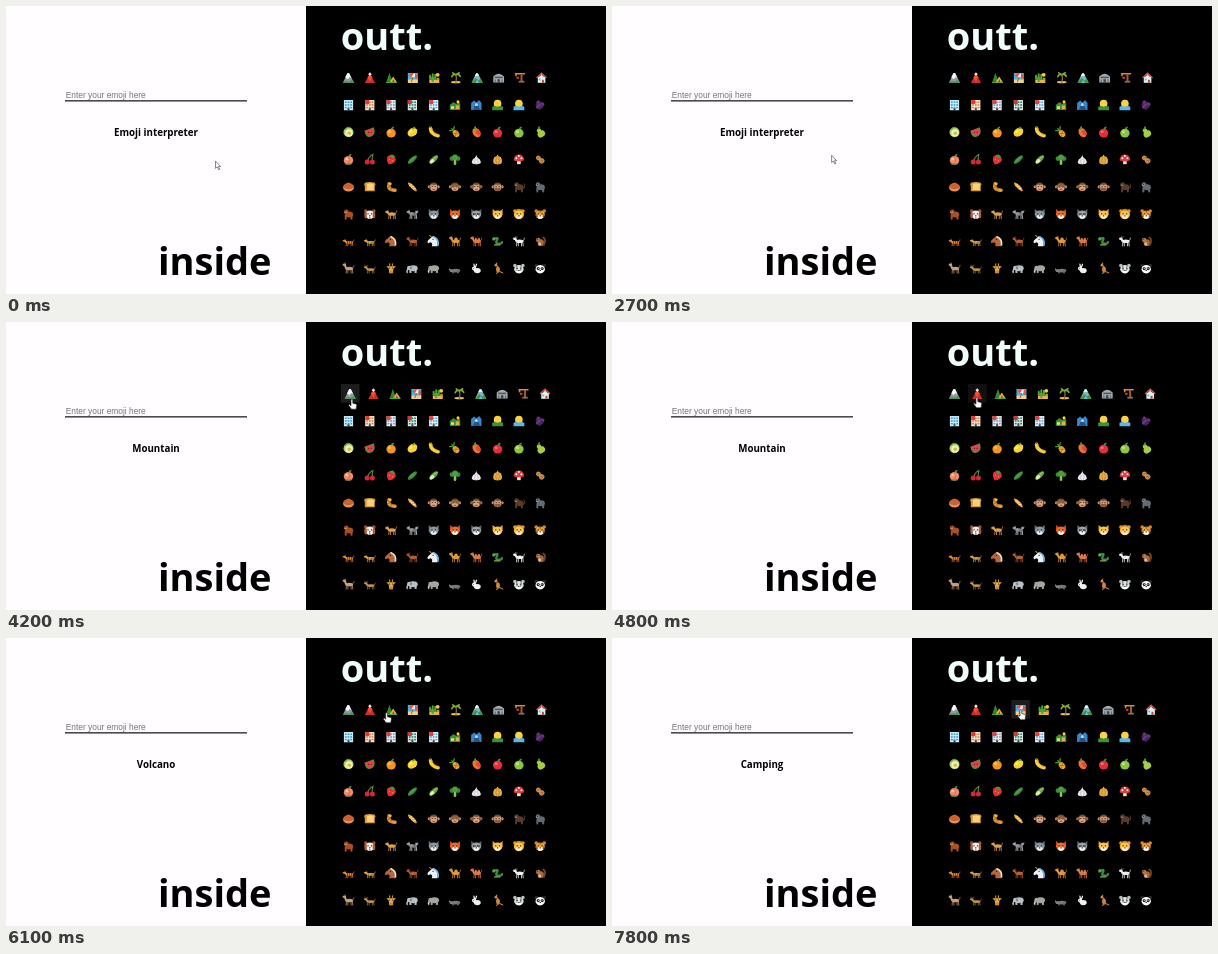
Write an HTML page that moves like this. It is 600 px wide and 288 px high and loops after 8 s.

```html
<!DOCTYPE html>
<html lang="en">
<head>
<meta charset="utf-8">
<title>Emoji interpreter</title>
<style>
html, body { margin: 0; width: 100%; height: 100%; overflow: hidden; background: #fffdff; }
svg { display: block; width: 100%; height: 100%; }
.big { font: bold 38px "Open Sans", "Noto Sans", sans-serif; }
.word { font: bold 9.75px "Open Sans", "Noto Sans", sans-serif; text-anchor: middle; }
.hint { font: 8.4px "Liberation Sans", Arial, sans-serif; fill: #757575; }
</style>
</head>
<body>
<svg viewBox="0 0 600 288">
  <rect width="600" height="288" fill="#fffdff"/>
  <rect x="300" width="300" height="288"/>
  <text class="big" x="152" y="269">inside</text>
  <text class="big" x="334.7" y="44" fill="#f0fffc">outt.</text>
  <text class="hint" x="59.7" y="92">Enter your emoji here</text>
  <rect x="59" y="94.2" width="182" height="1.3" fill="#222"/>
  <text class="word" id="word" x="150" y="129.5"></text>
  <g id="boxes"></g>
  <g id="grid"></g>
  <path id="arrow" d="M0 0v7.4l1.7-1.5 1.4 2.9 1.1-.5-1.3-2.8h2.2z" fill="#fff" stroke="#555" stroke-width=".7"/>
  <path id="hand" d="M-1 .8q.9-1.4 1.8 0v3.4l3.2.8q.8.3.7 1.3l-.6 3.9h-4.6l-2.8-3.8q.2-1.2 1.2-.7l1.1 1z" fill="#fff" stroke="#222" stroke-width=".6"/>
</svg>
<script>
const $ = id => document.getElementById(id);

// Shape helpers; every emoji is drawn around 0,0 within about 6 units.
const E = (x, y, a, b, f) => `<ellipse cx="${x}" cy="${y}" rx="${a}" ry="${b}" fill="${f}"/>`;
const O = (x, y, r, f) => E(x, y, r, r, f);
const R = (x, y, w, h, f) => `<rect x="${x}" y="${y}" width="${w}" height="${h}" fill="${f}"/>`;
const P = (d, f) => `<path d="${d}" fill="${f}"/>`;
const L = (d, f, w = 1) => `<path d="${d}" fill="none" stroke="${f}" stroke-width="${w}" stroke-linecap="round"/>`;
const turn = (a, s) => `<g transform="rotate(${a})">${s}</g>`;
const low = s => `<g transform="translate(0 1) scale(1 .75)">${s}</g>`;
const pair = (x, y, r, f) => O(-x, y, r, f) + O(x, y, r, f);

const green = '#3f9b35', dark = '#2a2320', ink = '#111';
const leaf = P('M0-3q0-3 3-2.6q0 2.4-3 2.6', green);
const pine = x => P(`M${x}-5l3 9h-6z`, '#2f8a2e');
const peak = f => P('M-5.6 5L-1-4.6h1.6L5.6 5z', f);

const tower = (wall, win, sign) => {
  let s = R(-4.6, -5, 9.2, 10.2, wall);
  for (let i = 0; i < 9; i++) s += R(-3.6 + i % 3 * 2.7, -3.6 + (i / 3 | 0) * 2.7, 1.8, 1.6, win);
  return s + R(-1, 3.2, 2, 2, '#345') + (sign ? R(-4.6, -5, 4, 4, sign) : '');
};
const fruit = (f, shine, a = 4.7, b = 4.4) => E(0, .8, a, b, f) + E(-1.5, -.6, 1.6, 1.2, shine) + leaf;
const sun = ground => O(0, -1.4, 3.8, '#ffd23c') + P('M-5.4 5.2v-3.4q2.6-1.6 5.4 0q2.8-1.6 5.4 0v3.4z', ground);
const palm = L('M0 5q1.4-5 0-8', '#9a6532', 1.2) + L('M-4-1q1-3 4-2q3-1.5 4.5 1.5M-3-5l3 2l3.5-2', '#7cae35', 1.6);

const face = (fur, muzzle, ear, sharp) =>
  (sharp ? P('M-5-5l4 3h2l4-3v6h-10z', ear) : pair(4, -3, 1.8, ear)) +
  E(0, .6, 4.7, 4.2, fur) + E(0, 2.6, 2.8, 2, muzzle) +
  pair(1.8, -.2, .65, ink) + E(0, 1.8, .8, .55, ink);
const stripes = L('M0-3.4v1.6M-4.4 1h1.3M4.4 1h-1.3M-4 2.8l1.2-.4M4 2.8l-1.2-.4', dark, .7);
const monkey = extra => pair(4.6, 0, 1.5, '#c98e63') + O(0, 0, 4.4, '#754a30') +
  pair(1.6, -.5, 1.9, '#dfa77c') + E(0, 2, 3.2, 2, '#dfa77c') + pair(1.5, -.5, .6, ink) + L('M-1 2.5h2', dark, .6) + extra;
const paws = (x, y) => pair(x, y, 1.7, '#8a5a3b');

const beast = (fur, legs, neck = 0, extra = '') =>
  L('M4-.5q1.8-.6 1.6-2.8', legs, .8) + L('M-2 1l-.4 3.6M-.6 1v3.6M2.6 1v3.6M3.9 1l.4 3.6', legs) +
  E(.8, 0, 3.9, 1.8, fur) + L(`M-2.4-.4L-3.8 ${-2 - neck}`, fur, 2) +
  E(-4.1, -2 - neck, 1.8, 1.3, fur) + L(`M-3.2 ${-3 - neck}v-.8`, legs, .8) + extra;
const heavy = (f, nose) => E(.8, -.4, 4.5, 3, f) + R(-3, 1, 2, 3.4, f) + R(2.2, 1, 2, 3.4, f) + O(-3.2, -.6, 2.2, f) + nose;
const horse = (coat, mane, extra = '') => P('M-1-5q5 0 5 10h-6q1.4-3-1-4l-2.6 1q-1.4-1 0-3z', coat) +
  L('M0-4.5q5 2 4.4 8', mane, 1.7) + O(-.6, -2, .6, ink) + extra;
const ape = (f, d) => E(.8, .5, 3.9, 3, f) + O(-2.2, -2.2, 2.3, f) + L('M-2.8 1v3.6M3 1v3.6', f, 2) + E(-2.9, -1.8, 1.3, 1.1, d) + O(-2.8, -2.4, .5, ink);

const rows = [
  [
    peak('#8d9aa3') + P('M-3.2-.6L-1-4.8h1.6L2.8 0L.8-.6L-.8 1.4z', '#f4f8fa') + P('M-5.8 5l3-2l3 1l3-2l2.6 3z', '#4b9a50'),
    P('M-5.2 5.2L-1.5-1.6h3L5.2 5.2z', '#c92f2a') + P('M-2.6 0l1.1-2h3L3 1 1.4 0 .3 4z', '#ff4a2b') + P('M0-5.6l1.8 2L0-1.6l-1.8-2z', '#f3e4e2'),
    pine(-2) + P('M-2 4.6L1.8-1.2L5.6 4.6z', '#f0b429') + P('M.7 4.6l1.2-3.4l1.3 3.4z', '#7d4a14') + R(-5.4, 4, 11, 1.2, '#5c9e31'),
    R(-5, -4.8, 10, 6.4, '#46b4e8') + R(-5, 1.4, 10, 3.8, '#f1d18a') + turn(20, P('M-4.6-.4q.6-4.4 4.6-4.4t4.6 4.4z', '#ee5136') + P('M-1.4-.4q0-4 1.4-4.4q1.4.4 1.4 4.4z', '#fff') + L('M0-.4v4.4', '#8b5a2b', .8)),
    R(-5, 1.6, 10, 3.6, '#e8b53a') + L('M-1.6 3.4v-7M-4.2-2v2.4h5.2v-3.4', '#4fa23c', 2) + O(3.4, -3, 1.9, '#ffc933') + R(2.4, 0, 2.6, 2, '#8fae3c'),
    E(0, 4.4, 4.8, 1.1, '#e9c46a') + palm,
    peak('#79b9bd') + P('M-2.6-1.6L-1-4.6h1.6L2-2z', '#e8f6f4') + P('M-5.6 5.2l4-5l3 2.4l2-2l2.2 4.6z', '#40933f') + P('M0 2l2 3.2h-4z', '#55c2ee'),
    P('M-5.4 4.6v-6q5.4-5.4 10.8 0v6z', '#a4adb2') + R(-4, -1.2, 8, 1.6, '#4d585e') + L('M-3.4 2v2M3.4 2v2', '#5e6a70', 1.2) + R(-1.2, 1.4, 2.4, 3.2, '#3c454a'),
    L('M-4.6-4h9M-4-4v2', '#e58b22', 1.5) + L('M1.4-3v6.4', '#a55a2b', 2) + R(-3.6, -1, 2.4, 2, '#c8472e') + R(-1.4, 3, 5.6, 1.8, '#8d6e50'),
    R(-3.8, -1, 7.6, 6, '#dff2f2') + L('M-4.6-.2L0-4.6L4.6-.2', '#d4574d', 1.4) + P('M-3-.4L0-3.4L3-.4z', '#dff2f2') + R(.4, 2, 2, 3, '#b3503c') + R(-2.8, .8, 1.8, 1.8, '#63b7dc')
  ],
  [
    tower('#d4eef8', '#3c9fd4'), tower('#f4e6da', '#e0813a', '#e6372c'), tower('#f3ecec', '#6aa6c8', '#e24238'),
    tower('#e4e9e6', '#2f7f72', '#c93b35'), tower('#edf5f9', '#57a9d8', '#ea3d36'),
    P('M-5.2 5v-5l3.6-3l3 2l2-2.4l1.8 2v6.4z', '#3c8f32') + O(3, -3.4, 1.5, '#ffd23c') + R(-4, 1.2, 3, 2.6, '#f0dc6c') + R(.8, .4, 3.4, 3.6, '#d9b344'),
    P('M-5.2 5v-7l3-2.6l2.4 2l2.6-2.4l2.4 3v7z', '#3a86c4') + P('M-3.4 5L-.6-1.8h1.4L4 5z', '#20558c') + P('M-1.6 .6l1-2.4h1.4l1 2.4z', '#cde8fa'),
    sun('#3c9140'), sun('#58b7ec'),
    turn(25, [0, 1, 2, 3, 4, 5, 6, 7].map(i => O(-3 + i % 3 * 2.5 + (i > 5 ? 1.5 : 0), -1.8 + (i / 3 | 0) * 2.3, 1.7, i % 2 ? '#4c2560' : '#693a82')).join(''))
  ],
  [
    O(0, 0, 5, '#a8cf63') + O(.5, .6, 3.7, '#eff0b8') + O(.8, 1, 1.8, '#d3b84f') + L('M-3-3l2-2.4', green, 1),
    P('M-5.4-1.5L4-5q3 8-4 9.6q-4 .6-5.4-6', '#3f9b35') + P('M-4.4-1.5L3.4-4q2 6-3 7.4q-3.4 0-4.8-5', '#ee3c43') + pair(1.3, 0, .5, ink),
    fruit('#f79321', '#ffbc58'), turn(-35, E(0, 0, 5.2, 4, '#fbd32d') + E(-1, -1.4, 2, 1, '#fff07d')) + leaf,
    L('M-3.2-4q.2 6 7.6 7.4', '#f9cf3c', 3.6) + L('M-2-4q1 4.8 7 6.6', '#c98f1f', .7) + R(-4.4, -5.8, 2, 1.4, '#7d6220'),
    turn(-40, E(0, 1.6, 2.9, 3.8, '#eba82d') + L('M-2 0l4 3M2 0l-4 3', '#a66818', .6) + L('M0-2.5v-2.4M-1-3l-2-1.8M1-3l2-1.8', green, 1.3)),
    turn(-35, E(0, .4, 3.6, 5, '#f0742e') + E(1.4, 1.4, 2, 3, '#df4a34') + leaf),
    fruit('#e32f37', '#fa7172'), fruit('#8cc63c', '#c5e779'), turn(-35, E(0, 2, 4, 3.2, '#a5cf42') + E(0, -1.6, 2.2, 2.8, '#a5cf42') + leaf)
  ],
  [
    fruit('#f58b66', '#ffc09a') + L('M0-3q2 3 .4 7', '#d85f4f', .7) + L('M-3.4 4.4h6', green, 1),
    L('M-2.5 2Q-1-3 3-5Q2-1 2.4 2', '#538a31', 1.2) + pair(2.6, 2.4, 2.5, '#d72634'),
    turn(25, P('M-4.6-1.8q4.6-4 9.2 0q0 5-4.6 7.2q-4.6-2.2-4.6-7.2', '#e62f36') + pair(1.6, .6, .45, '#ffd27b') + P('M-3.6-3L0-2l3.6-1L1-5h-2z', green)),
    turn(-42, E(0, 0, 5.8, 2.2, '#3b8e36') + L('M-3-.4h6', '#78bd53', .6)),
    turn(-42, E(0, 0, 5.7, 2.4, '#66a83f') + E(-2.4, .2, 2.6, 1.7, '#d9efaa') + L('M1-.5h3', '#b3d777', .8)),
    L('M0 0v4.2', '#8fc25b', 2.6) + pair(3, -1, 2.4, '#3d8a34') + O(0, -2.2, 2.9, '#48a13d'),
    P('M0-5.4q0 3 3.4 5q3.2 5.2-3.4 5.2q-6.6 0-3.4-5.2q3.4-2 3.4-5', '#efe7ee') + L('M-1-.6q-2 3 0 5M1-.6q2 3 0 5', '#bdaac0', .6),
    P('M0-5q.4 2 3.4 2.7q3.4 7-3.4 7.3q-6.8-.3-3.4-7.3Q-.4-3 0-5', '#e8ac40') + L('M-1-2q-2 3 0 6M1-2q2 3 0 6', '#b97422', .6),
    R(-1.8, 0, 3.6, 4.6, '#f4e1c8') + P('M-5.4 .8q.6-5.8 5.4-5.8t5.4 5.8q-5 2-10.8 0', '#df393a') + pair(2.5, -1.4, 1, '#fff') + O(0, -3.6, .9, '#fff'),
    turn(-50, O(0, -2.4, 2.4, '#ce9152') + O(0, 2, 2.7, '#ce9152') + L('M-1-3l2 1M-1 1l2 1M-1 3h2', '#915b2d', .7))
  ],
  [
    P('M0-4.4q6 1.6 5.6 5.6q-5.6 1.2-11.2 0Q-6-2.8 0-4.4', '#d2602f') + P('M-5.6 1q5.6 1.4 11.2 0q-1 3.6-5.6 3.6t-5.6-3.6', '#ec9150'),
    P('M-5-4q5-1.6 10 0q1.4 2 0 3.2v5.2h-10v-5.2q-1.4-1.2 0-3.2', '#d99536') + P('M-3-3q4-1 7 .2v6h-7z', '#fcd27a'),
    L('M4 3.4q-8 0-6-6.4', '#e59b32', 3.4) + L('M-3.6-2l3 .8M-3.4 1.2l2.4-1.6M-.4 3.8l.6-2.6', '#965418', .7) + O(-.8, -3, 1.4, '#f2b650'),
    turn(45, E(0, 0, 6, 1.7, '#eda63c') + L('M-3 .8l1-1.6M-.5.8l1-1.6M2 .8l1-1.6', '#fff0c0', .7)),
    monkey(''), monkey(paws(1.7, -.7)), monkey(paws(4, -.2)), monkey(paws(1.2, 2.5)),
    ape('#5b3a29', '#b78461') + L('M4 2q3-1 1-5', '#5b3a29', 1), ape('#636b71', '#8d9499')
  ],
  [
    ape('#a94f22', '#dea071'),
    face('#f2e8df', '#fff', '#a0522d') + E(-4.2, 1, 1.3, 3.4, '#a85f38') + E(4.2, 1, 1.3, 3.4, '#a85f38') + E(0, 4, 1, 1, '#f05a6c'),
    beast('#d9a251', '#b77932'), beast('#73787d', '#a4a8ac', 0, pair(4, -2, 1.2, '#a4a8ac') + O(-1, -.5, 1.6, '#92979b')),
    face('#8998a0', '#e8ecef', '#62717a', 1), face('#ed6a27', '#fff', '#c84a1d', 1),
    face('#9da4a8', '#f3f3f3', '#62696d', 1) + E(-2, 0, 1.6, 1.1, '#383d40') + E(2, 0, 1.6, 1.1, '#383d40') + pair(1.8, -.1, .4, '#fff'),
    face('#fbc347', '#fff3cf', '#f0a830', 1), O(0, 0, 5.2, '#c97c25') + face('#ffc64a', '#fff3d3', '#e0972c'), face('#f6a02c', '#fff', '#e48322') + stripes
  ],
  [
    low(beast('#ef8729', '#d96718', 0, L('M-1-1v2M1-1.4v2M3-1v2', dark, .7))),
    low(beast('#e6a33b', '#c67c25', 0, pair(1.4, 0, .6, '#6d4118') + O(3, .3, .6, '#6d4118'))),
    horse('#b56739', '#eee1d0'), beast('#b5602c', '#8c451f', .6, L('M-2-1l-1-2.6', '#4b2415', 1)),
    horse('#eef2f8', '#63b8ed', L('M-2-4l-2-2', '#f5c849', 1)),
    beast('#e0983a', '#b9752a', 1.2, E(1, -1.8, 1.8, 1.9, '#e0983a')),
    beast('#dd7a3d', '#bd5a29', 1.2, E(-.5, -1.7, 1.2, 1.8, '#dd7a3d') + E(2.6, -1.7, 1.2, 1.8, '#dd7a3d')),
    L('M-3.6-2.6q5-2 3 1.4t1 3.4q4 .6 4-1.4', '#3c9143', 2.2) + O(-3.8, -2.4, 1.7, '#52ab4b') + L('M-3 3.6h5', '#8bb53b', 1.4),
    beast('#f0f0ee', '#c3c2bc', .5, L('M-3.5-4q1-1 2-.4', '#777', .7)),
    E(.6, 1.4, 3.2, 3.4, '#a4683b') + O(-2, -1.4, 2.2, '#b87846') + L('M3.6 3.6q2.6-5-.4-7.4', '#774525', 1.8) + O(-2.5, -2, .5, ink) + E(-.5, 2.6, 1.4, 1.6, '#e2bd8b')
  ],
  [
    beast('#c4a17b', '#967252', 1.8), low(beast('#c9963f', '#8f6a31', 1, L('M-4-4l-1-1.8M-3-4l1.2-1.8', '#9b7047', .8))),
    P('M-4.8-2.4h9.6l-2.4 2.4l-.6 4.4h-3.6l-.6-4.4z', '#edae3c') + E(0, 3.4, 2.2, 1.6, '#d08a2e') + L('M-1.4-3v-1.8M1.4-3v-1.8', '#c98530', 1.2) + pair(1.4, -.6, .55, ink),
    heavy('#b9c0c4', L('M-4.4 0q-1.4 2-.8 4', '#b9c0c4', 1.4) + E(-1.4, -.8, 1.2, 1.6, '#7f8b92')),
    heavy('#a8a49e', L('M-4.4 0q-1.2 2-.6 4', '#a8a49e', 1.5) + L('M-4 2l-1.4 1', '#fff', .7)),
    low(E(.8, 1.4, 4.5, 2.6, '#757b7f') + L('M-2 2v2.4M3 2v2.4', '#666d72', 1.8) + E(-3.6, 1.6, 1.9, 1.6, '#858c90') + P('M-5.8 1l.4-2.6l1 2z', '#d9dcd8')),
    E(1, 2, 3.4, 2.6, '#eef0f2') + O(-2.2, 0, 2.1, '#f8f8f8') + L('M-1.8-1.5l-.6-3M-.8-1.5l1-2.8', '#f0e8ea', 1.3) + O(-2.8, 0, .5, '#c33'),
    E(.4, 1, 1.9, 3, '#d2883a') + O(-1.6, -3.4, 1.4, '#dc9748') + L('M-1.4-4l.5-1.4M0-2l-.6 1M2 3l3.2 1.4M1 3l-2 1.8', '#c67a2d', 1.2),
    face('#dfe2e3', '#fff', '#b8bdc0') + L('M-2.2-3l.4 4.8M2.2-3l-.4 4.8', '#6a7075', 1),
    face('#fafafa', '#fff', '#25282b') + E(-2, 0, 1.5, 1.6, '#25282b') + E(2, 0, 1.5, 1.6, '#25282b') + pair(1.8, -.2, .5, '#fff')
  ]
];

const LOOP = 8000, X0 = 342.5, Y0 = 71.8, STEP = 21.45, GROW = 3.5;
$('grid').innerHTML = rows.map((row, r) => row.map((s, c) =>
  `<g transform="translate(${X0 + c * 21.3} ${Y0 + r * 27.25})">${s}</g>`).join('')).join('');
const top10 = [...$('grid').children].slice(0, 10);

// Hovered cells of the first row: start and end of each hover.
const hovers = [[3100, 4500], [4600, 6000], [6100, 7300], [7400, 9000]];
$('boxes').innerHTML = hovers.map(() => `<rect y="62" width="18.6" height="18.6" fill="#1d1d1d"/>`).join('');
const boxes = [...$('boxes').children];

const words = [[0, 'Emoji interpreter'], [4200, 'Mountain'], [5400, 'Volcano'], [6700, 'Camping']];
const moves = [[2600, 3200, 346, 77], [4400, 4700, 365, 75.5], [5900, 6150, 382.5, 74.5], [7200, 7500, 409, 71.5]];

const clamp = v => Math.min(1, Math.max(0, v));
const smooth = v => v * v * (3 - 2 * v);

// Grows in gently, collapses almost at once.
function hover([on, off], t) {
  const up = 1 - (1 - clamp((t - on) / 400)) ** 2;
  return up * clamp(1 - (t - off + 50) / 150);
}

function draw(t) {
  let x = 209.5, y = 155;
  for (const [a, b, tx, ty] of moves) {
    const p = smooth(clamp((t - a) / (b - a)));
    x += (tx - x) * p;
    y += (ty - y) * p;
  }
  const over = x > 335;
  $('arrow').setAttribute('visibility', over ? 'hidden' : 'visible');
  $('hand').setAttribute('visibility', over ? 'visible' : 'hidden');
  $(over ? 'hand' : 'arrow').setAttribute('transform', `translate(${x} ${y})`);

  let shift = 0;
  top10.forEach((g, i) => {
    const w = hovers[i] ? hover(hovers[i], t) : 0;
    const cx = X0 + i * STEP + shift + w * GROW / 2;
    g.setAttribute('transform', `translate(${cx} ${Y0})`);
    if (boxes[i]) {
      boxes[i].setAttribute('x', cx - 9.3);
      boxes[i].setAttribute('opacity', w * w);
    }
    shift += w * GROW;
  });
  $('word').textContent = words.filter(([a]) => t >= a).pop()[1];
}

const start = performance.now();
function tick() {
  const t = (performance.now() - start) % LOOP;
  draw(Math.floor(t / 100) * 100);
  requestAnimationFrame(tick);
}
tick();
</script>
</body>
</html>
```
